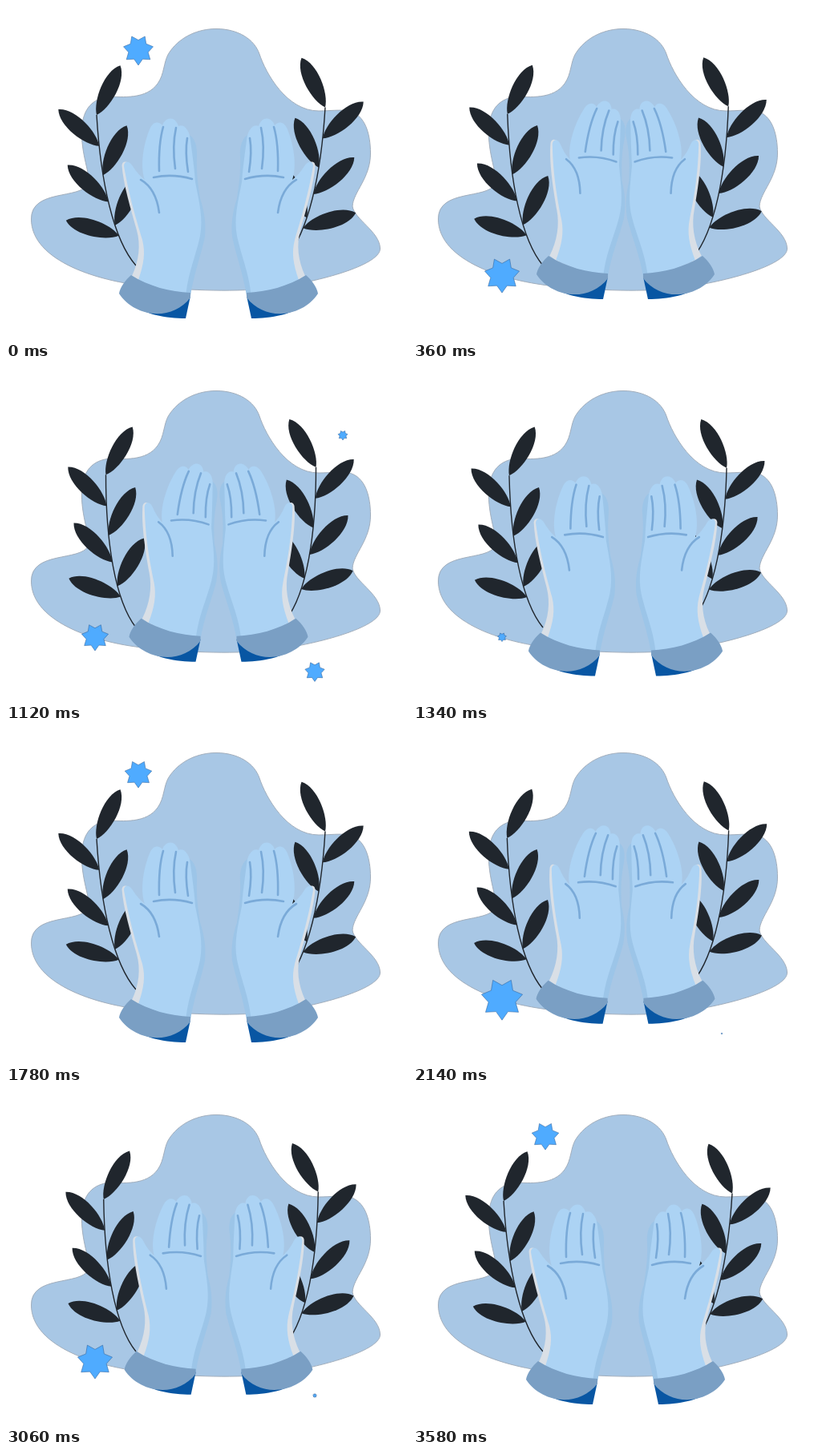
Write an HTML page that moves like this. It is 500 by 417 pixels and loops after 3.6 s.

```html
<!DOCTYPE html>
<html lang="en">
<head>
<meta charset="utf-8">
<title>Open hands</title>
<style>
html, body { margin: 0; width: 100%; height: 100%; overflow: hidden; background: #fff; }
svg { display: block; width: 100vw; height: 100vh; }
</style>
</head>
<body>
<svg viewBox="0 0 500 417" preserveAspectRatio="none">
  <defs>
    <g id="plant"></g>
    <g id="hand">
      <path class="bend" fill="#d9dfe6" d="M144.5 199C146 222 156 255 163 280C168 298 166 318 157 337L169 345L178 290L156 200C152 193 145 193 144.5 199Z"/>
      <path class="bend" fill="#9cc5e8" d="M224 160C232 160 239 170 238 188C237 210 240 225 242 240C249 262 249 275 248 288C243 312 234 335 230 362L200 360L210 200Z"/>
      <path class="bend" fill="#acd3f4" d="M165 342C172 322 174 308 170 292C163 268 154 240 147 200C147 193 154 193 158 200C163 208 168 213 173 217C167 200 171 172 180 152C184 144 191 144 195 149C199 138 211 137 215 150C222 147 229 155 230 168C233 190 235 205 236 220C241 245 246 265 242 287C236 315 226 335 224 366Z"/>
      <g fill="none" stroke="#7aaad8" stroke-width="2.6" stroke-linecap="round">
        <path class="bend" d="M191 206Q190 172 196 151"/>
        <path class="bend" d="M211 203Q207 175 212 152"/>
        <path class="bend" d="M227 207Q223 182 226 165"/>
        <path class="bend" d="M184 214Q208 209 232 216"/>
        <path class="bend" d="M168 217Q187 228 191 258"/>
      </g>
      <g id="cuff">
        <path fill="#0856a3" d="M150 368C172 386 200 390 224 390L230 362Z"/>
        <path fill="#7a9fc4" d="M156 336C148 343 142 352 141 359C160 388 206 395 230 364L230 358C205 357 178 350 156 336Z"/>
      </g>
    </g>
  </defs>
  <path fill="#a8c7e5" stroke="#a2aebc" stroke-width="1" d="M262 28.500C290 28.500 310 42 316 60C324 84 350 131 390 131C404 131 416 129 428 131C448 136 454.500 160 454.500 184C454.500 215 433 232 432 250C434 266 466.500 282 466.500 303C466.500 322 400 342 340 351C300 357 240 356 190 351C115 346 31.500 318 31.500 266C31.500 228 92 242 103 222C106 212 93 185 94.500 153C96 128 108 115 130 113C150 114 180 116 192 92C198 80 197 66 205 56C218 38 240 28.500 262 28.500Z"/>
  <use href="#plant"/>
  <use href="#plant" transform="translate(511 -9.500) scale(-1 1)"/>
  <use href="#hand"/>
  <use href="#hand" transform="translate(530 0) scale(-1 1)"/>
  <g id="stars" fill="#4fabff" stroke="#2c5c94" stroke-opacity=".75" stroke-width=".7" stroke-linejoin="round"></g>
</svg>
<script>
const CYCLE = 1800;
const byId = id => document.getElementById(id);
const smooth = x => { x = Math.min(1, Math.max(0, x)); return x * x * (3 - 2 * x); };

function add(parent, attrs) {
  const el = document.createElementNS('http://www.w3.org/2000/svg', 'path');
  for (const key in attrs) el.setAttribute(key, attrs[key]);
  parent.appendChild(el);
  return el;
}

// One stem carries leaves that alternate between its two sides.
const plant = byId('plant');
const root = [162, 324], low = [134, 292], high = [118, 220], top_ = [113, 136];
const onStem = t => root.map((p, i) => p * (1 - t) ** 3 + 3 * low[i] * t * (1 - t) ** 2
  + 3 * high[i] * t * t * (1 - t) + top_[i] * t ** 3);

add(plant, { fill: 'none', stroke: '#20262d', 'stroke-width': 1.4, d: `M${root}C${low} ${high} ${top_}` });
[-64.5, -138, -64.5, -138, -64.5, -164].forEach((angle, i) => {
  const [x, y] = onStem(Math.max(0.29, 1 - 0.158 * i));
  add(plant, {
    fill: '#20262d',
    d: 'M0 0C14 -11.500 54 -15.500 68.500 0C54 15.500 14 11.500 0 0Z',
    transform: `translate(${x} ${y}) rotate(${angle})`
  });
});

// The hand turns around the wrist, more so the further a point lies from it.
const wrist = { x: 195, y: 350 };
const bent = [...document.querySelectorAll('.bend')].map(el => ({ el, d: el.getAttribute('d') }));

function bend(d, k) {
  return d.replace(/([\d.]+) ([\d.]+)/g, (_, px, py) => {
    const x = px - wrist.x, y = py - wrist.y;
    const a = k * 0.00053 * (Math.hypot(x, y) - 0.4 * x);
    const c = Math.cos(a), s = Math.sin(a);
    return (wrist.x + x * c - y * s).toFixed(2) + ' ' + (wrist.y + x * s + y * c).toFixed(2);
  });
}

function starPath(r) {
  let d = '';
  for (let i = 0; i < 14; i++) {
    const a = Math.PI * (0.5 + i / 7), q = r * (i % 2 ? 0.66 : 1);
    d += (i ? 'L' : 'M') + (q * Math.cos(a)).toFixed(2) + ' ' + (q * Math.sin(a)).toFixed(2);
  }
  return d + 'Z';
}

const stars = [
  { x: 165, y: 55, size: 19, rise: 200, fall: 320, peaks: [0, 600] },
  { x: 420, y: 84, size: 21, rise: 385, fall: 170, peaks: [1000] },
  { x: 111, y: 336, size: 28.5, rise: 270, fall: 138, peaks: [330, 1230] },
  { x: 385, y: 379, size: 12.5, rise: 165, fall: 175, peaks: [177, 630, 1120] }
];
for (const s of stars) s.el = add(byId('stars'), { transform: `translate(${s.x} ${s.y})` });

function glow(t, { size, rise, fall, peaks }) {
  return size * Math.max(0, ...peaks.map(peak => {
    const dt = (t - peak + 1.5 * CYCLE) % CYCLE - CYCLE / 2;
    return 1 - (dt < 0 ? -dt / rise : dt / fall);
  }));
}

function draw(ms) {
  const t = ms % CYCLE;
  const join = smooth(t / 407) - smooth((t - 1052) / 414);
  const lean = smooth(1 - Math.abs(t - 900) / 900);

  byId('hand').setAttribute('transform', `translate(${13.5 * join} ${-25 * join})`);
  for (const { el, d } of bent) el.setAttribute('d', bend(d, join));
  plant.setAttribute('transform', `rotate(${4.1 * lean} ${root})`);
  for (const s of stars) {
    const r = glow(t, s);
    s.el.setAttribute('d', r > 0.3 ? starPath(r) : '');
  }
}

const begin = performance.now();
function tick(now) {
  draw(Math.max(0, now - begin));
  requestAnimationFrame(tick);
}
draw(0);
requestAnimationFrame(tick);
</script>
</body>
</html>
```
